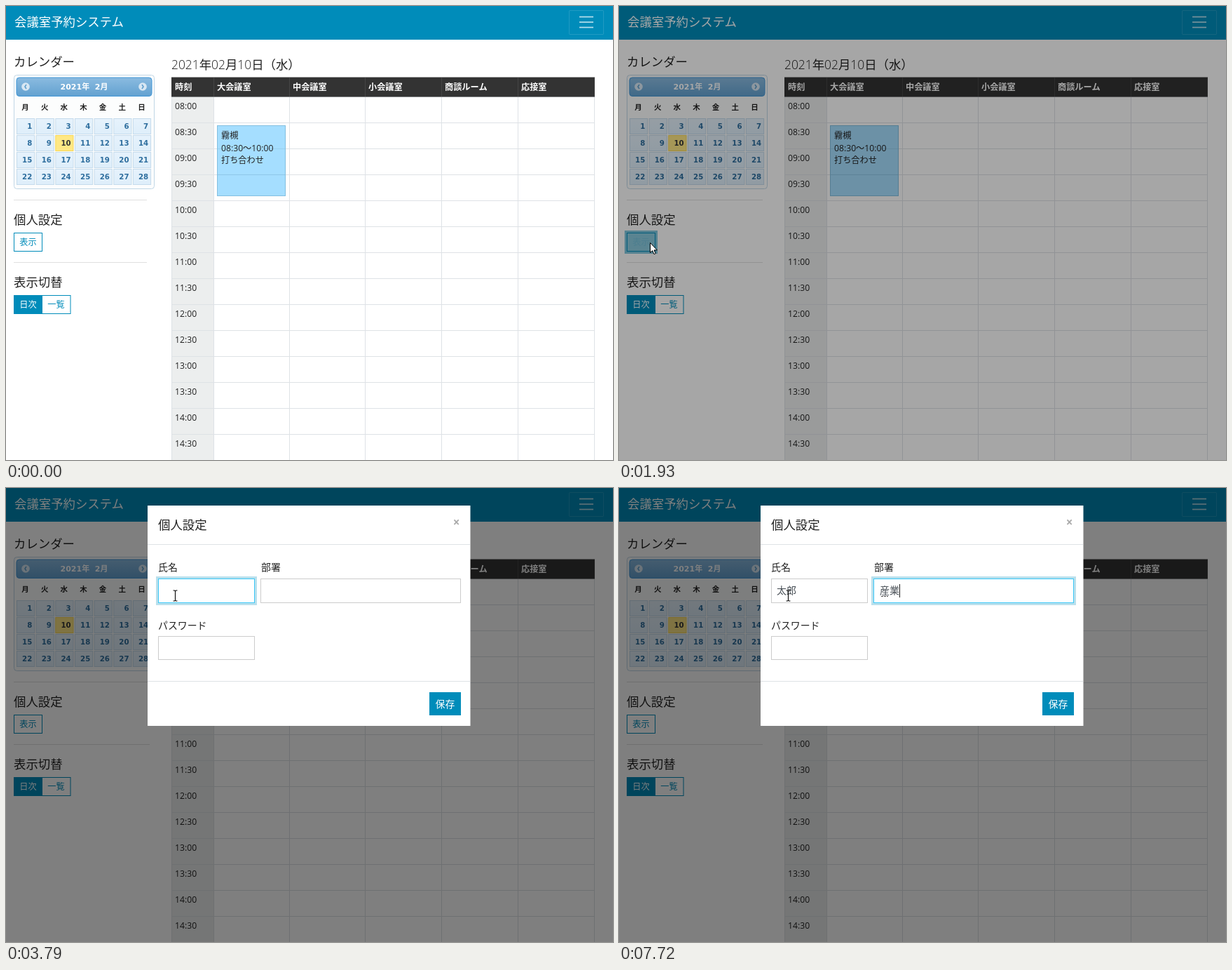
Write an HTML page that moves like this. It is 866 px wide and 647 px high and loops after 8 s.

```html
<!DOCTYPE html>
<html lang="ja">
<head>
<meta charset="utf-8">
<title>会議室予約システム</title>
<style>
html, body { margin: 0; width: 100%; height: 100%; overflow: hidden; background: #fff; }
svg { display: block; width: 866px; height: 647px; font-family: "Open Sans", "Noto Sans CJK JP", "Noto Sans CJK", sans-serif; }
text { white-space: pre; }
.cal { font-family: "DejaVu Sans", "Noto Sans CJK JP", "Noto Sans CJK", sans-serif; font-weight: 700; }
</style>
</head>
<body>
<svg id="stage" viewBox="0 0 866 647"></svg>
<script>
const LOOP = 8000, BLUE = '#008cba', INK = '#222', LINE = '#dee2e6';

// Markup helpers; text is placed by its left edge and vertical centre.
const rect = (x, y, w, h, fill, more = '') =>
  `<rect x="${x}" y="${y}" width="${w}" height="${h}" fill="${fill}" ${more}/>`;
const line = (x1, y1, x2, y2, color, more = '') =>
  `<path d="M${x1} ${y1}L${x2} ${y2}" stroke="${color}" ${more}/>`;
const text = (x, cy, str, size, fill = INK, more = '') =>
  `<text x="${x}" y="${cy + size * .37}" font-size="${size}" fill="${fill}" ${more}>${str}</text>`;
const range = n => [...Array(n).keys()];
const repeat = (n, make) => range(n).map(make).join('');
const bold = 'font-weight="700"';
const middle = 'text-anchor="middle"';

function navbar() {
  return rect(0, 0, 866, 48, BLUE) +
    text(12, 23, '会議室予約システム', 17.4, '#fff') +
    rect(803.5, 6.5, 49, 34, 'none', 'stroke="#fff" stroke-opacity=".13" rx="1"') +
    [15.5, 23, 30.5].map(y => line(818, y, 838, y, '#fff', 'stroke-opacity=".72" stroke-width="1.7"')).join('');
}

function calendar() {
  const step = 27.65;
  const arrow = (x, d) => `<circle cx="${x}" cy="115" r="5.8" fill="#d8e7f3"/>
    <path d="M${x - d} 112l${2 * d} 3l${-2 * d} 3" fill="none" stroke="#5f9fcd" stroke-width="1.6"/>`;
  const day = i => {
    const x = 15.5 + i % 7 * step, y = 160.5 + Math.floor(i / 7) * 24, today = i === 9;
    return rect(x, y, 25.2, 22, today ? '#ffe885' : 'url(#cell)', `stroke="${today ? '#f5d657' : '#c5dbec'}"`) +
      text(x + 21.8, y + 10.7, i + 1, 10.2, today ? '#363636' : '#2e6e9e', 'class="cal" text-anchor="end"');
  };
  return rect(11.5, 98.5, 200, 162, '#fcfdfd', 'rx="4" stroke="#c0d6e6"') +
    rect(15, 102, 193, 26.5, 'url(#bar)', 'rx="4" stroke="#4297d7"') +
    arrow(28, -1) + arrow(195, 1) +
    text(111.5, 114.5, '2021年\u00a0\u00a02月', 11, '#fff', `class="cal" ${middle}`) +
    [...'月火水木金土日'].map((d, i) => text(27.5 + i * step, 144.5, d, 10.5, INK, `class="cal" ${middle}`)).join('') +
    repeat(28, day);
}

function sidebar() {
  const rule = y => `<path class="rule" d="M11 ${y}H201" stroke="#000" stroke-opacity=".12"/>`;
  return text(11, 80, 'カレンダー', 17.4) + calendar() +
    rule(276.5) + text(11, 305, '個人設定', 17.4) +
    rect(0, 0, 0, 0, BLUE, 'id="showRing"') +
    rect(11.5, 323.5, 40, 26, '#fff', `stroke="${BLUE}"`) +
    rect(11, 323, 41, 27, BLUE, 'id="showFill"') +
    text(31.5, 336.5, '表示', 12.2, BLUE, `id="showText" ${middle}`) +
    rule(365.5) + text(11, 394, '表示切替', 17.4) +
    rect(11.5, 412.5, 80.5, 26, '#fff', `stroke="${BLUE}"`) + rect(11, 412, 41, 27, BLUE) +
    text(31.5, 425.5, '日次', 12.2, '#fff', middle) + text(71.5, 425.5, '一覧', 12.2, BLUE, middle);
}

function timetable() {
  const edges = [296.5, 404.5, 512.5, 621.5, 730.5, 839.5];
  const rooms = ['大会議室', '中会議室', '小会議室', '商談ルーム', '応接室'];
  const clock = i => `${String(8 + (i >> 1)).padStart(2, '0')}:${i % 2 ? '30' : '00'}`;
  return text(236, 84, '2021年02月10日（水）', 17.4, INK, 'font-weight="300"') +
    rect(236, 129, 60, 518, '#eceeee') +
    repeat(14, i => line(236, 129.5 + i * 37, 840, 129.5 + i * 37, LINE) +
      text(241, 142.5 + i * 37, clock(i), 12.2)) +
    [236.5, ...edges].map(x => line(x, 129, x, 647, LINE)).join('') +
    rect(236, 101.5, 604, 28, '#333') +
    edges.map(x => line(x, 102, x, 129, '#454545')).join('') +
    text(241, 115, '時刻', 12.2, '#fff', bold) +
    rooms.map((r, i) => text(edges[i] + 4.5, 115, r, 12.2, '#fff', bold)).join('') +
    rect(301.5, 170.5, 97, 100, '#a5deff', 'stroke="#83bfe0"') +
    line(302, 203.5, 398, 203.5, '#9ad0ef') + line(302, 240.5, 398, 240.5, '#8fc7e8') +
    ['霧槻', '08:30～10:00', '打ち合わせ'].map((s, i) => text(307, 184.5 + i * 17.6, s, 12.2)).join('');
}

const fields = [
  { x: 217.5, y: 129.5, w: 137, h: 34, textX: 225 },
  { x: 363.5, y: 129.5, w: 285, h: 34, textX: 372 },
  { x: 217.5, y: 211.5, w: 137, h: 33 },
];

function dialog() {
  return rect(202, 25, 460.5, 314, '#fff') +
    text(217, 52.5, '個人設定', 17.4) +
    text(642.5, 49, '×', 17, '#aaa', `${bold} ${middle}`) +
    line(202, 80.5, 662, 80.5, LINE) + line(202, 275.5, 662, 275.5, LINE) +
    text(217, 113, '氏名', 13.9) + text(364, 113, '部署', 13.9) + text(217, 195.5, 'パスワード', 13.9) +
    fields.map((f, i) => rect(0, 0, 0, 0, BLUE, `id="ring${i}"`) +
      rect(f.x, f.y, f.w, f.h, '#fff', `id="field${i}" stroke="#ccc"`)).join('') +
    rect(604, 291, 45, 33, BLUE) + text(626.5, 307.5, '保存', 13.9, '#fff', `${middle} font-weight="500"`);
}

const gradient = (id, top, bottom) => `<linearGradient id="${id}" x2="0" y2="1">
  <stop stop-color="${top}"/><stop offset="1" stop-color="${bottom}"/></linearGradient>`;

const stage = document.getElementById('stage');
stage.innerHTML = `<defs>${gradient('bar', '#8bbbe0', '#62a1d0')}${gradient('cell', '#e6f2fc', '#deeefa')}</defs>` +
  rect(0, 0, 866, 647, '#fff') + navbar() + sidebar() + timetable() +
  rect(0, 0, 866, 647, '#000', 'id="backdrop"') +
  `<g id="modal">${dialog()}</g><g id="ime"></g>
  <path id="arrow" d="M.5 .5V14.5L3.7 11.6L6 16.7L8.2 15.7L6 10.9H10.4Z" fill="#fff" stroke="#000"/>
  <path id="beam" d="M-3 -7.5H-1L0 -6.5L1 -7.5H3M0 -6.5V6.5M-3 7.5H-1L0 6.5L1 7.5H3" fill="none" stroke="#111" stroke-width="1.2"/>`;

const el = id => document.getElementById(id);
const set = (id, attrs) => Object.entries(attrs).forEach(([k, v]) => el(id).setAttribute(k, v));
const ramp = (t, start, length = 150) => Math.min(1, Math.max(0, (t - start) / length));
const easeOut = p => 1 - (1 - p) ** 2;
const easeInOut = p => p * p * (3 - 2 * p);
const mix = (a, b, p) => a + (b - a) * p;

// Focus glow: grows outward from the box edge.
function glow(id, x, y, w, h, amount, alpha) {
  const s = 3 * amount;
  set(id, { x: x - s, y: y - s, width: w + 2 * s, height: h + 2 * s, opacity: alpha * amount });
}

const guesses = {
  ta: { width: 245, items: ['ただいま席を外しております', '対応', '担当', '大変', '確かに'] },
  taro: { width: 172, items: ['太郎', '太郎さん', '太郎くん', '太郎様', 'たろう'] },
  sa: { width: 191, items: ['参加', '作成', '先ほど', '参考', '削除'] },
  san: { width: 198, items: ['参加', '産業', '三月', '参考にしてください', '賛成'] },
};

// Typing steps: start time, field, text, underline style, suggestions.
const typing = [
  [3230, 0, ''], [3870, 0, 'ｔ', 'dash'], [4010, 0, 'た', 'dash'], [4090, 0, 'た', 'dash', 'ta'],
  [4260, 0, 'たｒ', 'dash', 'ta'], [4350, 0, 'たろ', 'dash', 'ta'], [4430, 0, 'たろ', 'dash', 'taro'],
  [4530, 0, 'たろう', 'dash', 'taro'], [4830, 0, '太郎', 'solid'], [5230, 0, '太郎'], [5360, 1, ''],
  [6400, 1, 'ｓ', 'dash'], [6480, 1, 'さ', 'dash', 'sa'], [6630, 1, 'さｎ', 'dash', 'sa'],
  [6780, 1, 'さんｇ', 'dash', 'sa'], [6870, 1, 'さんｇ', 'dash', 'san'], [7170, 1, 'さんぎ', 'dash', 'san'],
  [7250, 1, 'さんぎｙ', 'dash', 'san'], [7320, 1, 'さんぎょ', 'dash', 'san'],
  [7400, 1, 'さんぎょう', 'dash', 'san'], [7470, 1, '産業', 'solid'], [7720, 1, '産業', 'trace'],
];
const caretOff = [[3780, 3870], [5925, 6400]];

function suggestions(x, { width, items }) {
  return rect(x + .5, 165.5, width, 139, '#fff', 'stroke="#b8b8b8"') +
    items.map((s, i) => text(x + 30, 179 + i * 22.5, s, 13.9)).join('') +
    rect(x + 1, 282, width - 1, 22, '#f0f0f0') + text(x + 9, 293, 'Tab キーで選択します', 11, '#666');
}

function inputMethod(t) {
  const step = typing.filter(s => s[0] <= t).pop();
  if (!step) return '';
  const [, field, str, underline, list] = step;
  const x = fields[field].textX, end = x + 14 * str.length;
  let out = field ? text(225, 146, '太郎', 14, '#495057') : '';
  out += text(x, 146, str, 14, '#495057');
  if (underline === 'dash') out += line(x + 1, 154.5, end - 1, 154.5, '#333', 'stroke-dasharray="3 1"');
  if (underline === 'solid') out += line(x + 1, 154.5, end - 1, 154.5, '#333', 'stroke-width="1.5"');
  if (underline === 'trace') out += line(x + 2, 154.5, x + 12, 154.5, '#444', 'stroke-dasharray="3 1"');
  if (!caretOff.some(([a, b]) => t >= a && t < b)) out += line(end + .5, 137, end + .5, 156, INK);
  return out + (list ? suggestions(x - 30, guesses[list]) : '');
}

function pointer(t) {
  if (t < 1010) {
    const p = easeOut(ramp(t, 210, 780));
    return [mix(718, 72, p), mix(634, 366, p)];
  }
  if (t < 2590) {
    const p = easeOut(ramp(t, 1010, 370));
    return [mix(72, 44, p), mix(366, 337, p)];
  }
  const p = easeInOut(ramp(t, 2590, 620));
  return [mix(44, 241.5, p), mix(337, 153.5, p)];
}

function draw(t) {
  const hover = ramp(t, 1200) - ramp(t, 1850);
  set('showFill', { opacity: hover });
  set('showText', { fill: `rgb(${255 * hover},${mix(140, 255, hover)},${mix(186, 255, hover)})` });
  glow('showRing', 11, 323, 41, 27, ramp(t, 1680) - ramp(t, 2250), .5);

  // The scrollbar disappears while the dialog is open, so the rules widen.
  const ruleEnd = t < 1826 ? 201 : 205;
  document.querySelectorAll('.rule').forEach((r, i) => r.setAttribute('d', `M11 ${i ? 365.5 : 276.5}H${ruleEnd}`));

  set('backdrop', { opacity: .5 * ramp(t, 1826) });
  const slide = easeOut(ramp(t, 1958, 300));
  set('modal', { opacity: ramp(t, 1960), transform: `translate(${slide < 1 ? .6 : 0} ${-50 * (1 - slide)})` });

  const leave = ramp(t, 5350);
  [ramp(t, 3230) - leave, leave].forEach((focus, i) => {
    const { x, y, w, h } = fields[i];
    glow('ring' + i, x - .5, y - .5, w + 1, h + 1, focus, .27);
    set('field' + i, { stroke: `rgb(${mix(204, 59, focus)},${mix(204, 200, focus)},${mix(204, 248, focus)})` });
  });
  el('ime').innerHTML = inputMethod(t);

  const [x, y] = pointer(t);
  const overField = x > 217 && x < 355 && y > 129 && y < 164;
  const at = `translate(${Math.round(x)} ${Math.round(y)})`;
  set('arrow', { transform: at, visibility: t >= 230 && !overField ? 'visible' : 'hidden' });
  set('beam', { transform: `translate(${x} ${y})`, visibility: overField ? 'visible' : 'hidden' });
}

const origin = performance.now();
function tick() {
  draw((performance.now() - origin) % LOOP);
  requestAnimationFrame(tick);
}
tick();
</script>
</body>
</html>
```
